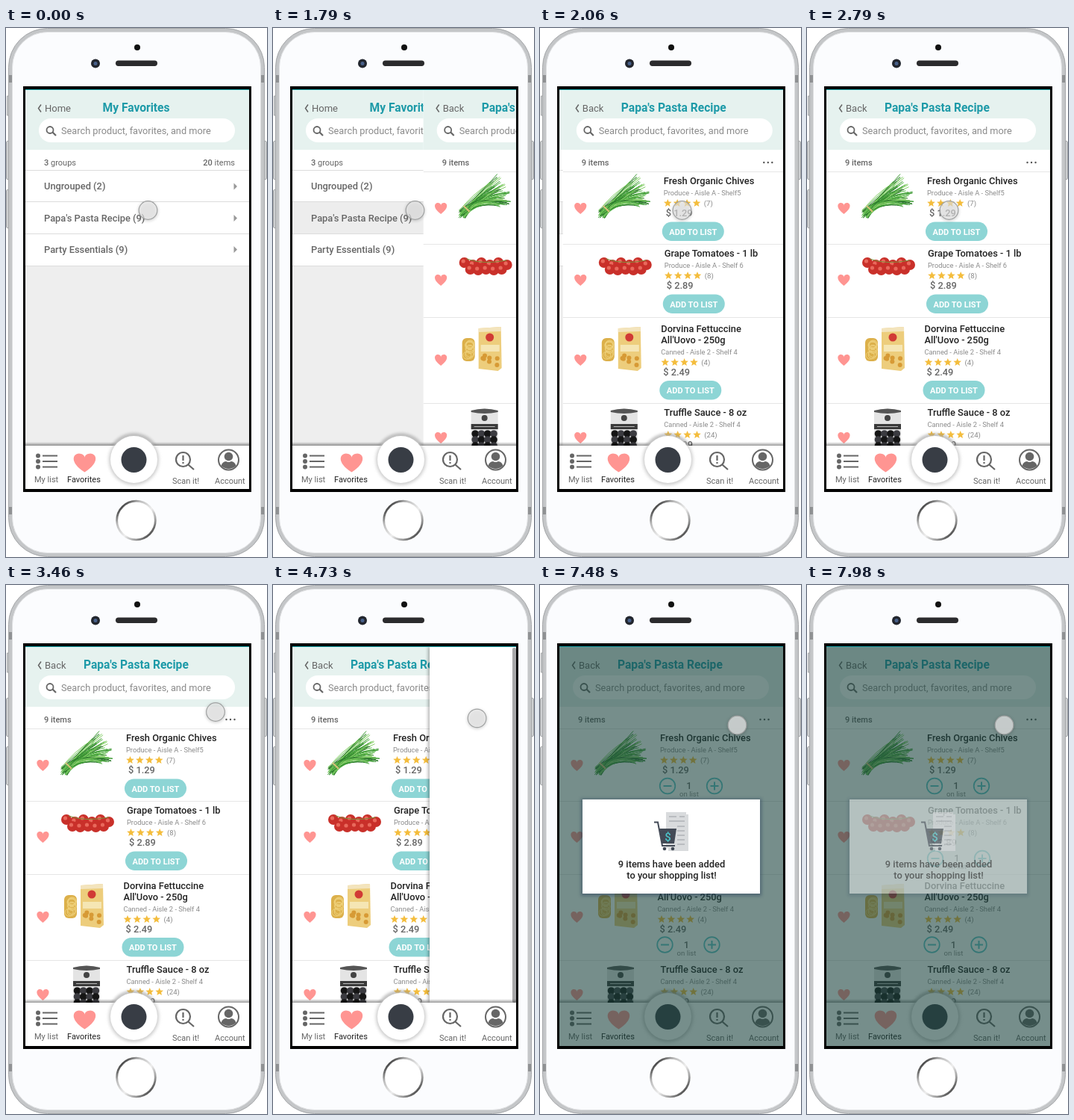
Animation, 350 px wide and 708 px high, one loop 8 s. Source, as an HTML page:

```html
<!DOCTYPE html>
<html lang="en">
<head>
<meta charset="utf-8">
<title>Favorites list</title>
<style>
html, body { margin: 0; width: 100%; height: 100%; overflow: hidden; background: #fff; }
svg { display: block; width: 350px; height: 708px; font-family: Roboto, sans-serif; font-size: 11px; fill: #666; }
.title { font-size: 15.6px; font-weight: 700; fill: #1d9aa8; }
.back { font-size: 13px; }
.hint { font-size: 12.75px; fill: #8a8a8a; }
.row { font-size: 12.85px; font-weight: 500; }
.name { font-size: 12.85px; font-weight: 500; fill: #222; }
.place { font-size: 9.3px; fill: #8b8b8b; }
.votes { font-size: 9.6px; fill: #8b8b8b; }
.price { font-size: 12.8px; font-weight: 500; }
.add { font-weight: 700; fill: #fff; }
.mid { text-anchor: middle; }
.b { font-weight: 500; }
.line { fill: none; stroke: #666; stroke-width: 2.2; }
.rule { stroke: #dcdcdc; }
</style>
</head>
<body>
<svg viewBox="0 0 350 708">
  <defs>
    <clipPath id="screen"><path d="M26 82H326V617H26Z"/></clipPath>
    <linearGradient id="steel" x2="1" y2="1">
      <stop offset=".08" stop-color="#222"/><stop offset=".3" stop-color="#bbb"/>
      <stop offset=".55" stop-color="#eee"/><stop offset=".75" stop-color="#999"/><stop offset=".95" stop-color="#222"/>
    </linearGradient>
    <linearGradient id="edge" x2="0" y2="1">
      <stop stop-color="#000" stop-opacity="0"/><stop offset="1" stop-color="#000" stop-opacity=".4"/>
    </linearGradient>
    <filter id="soft" x="-50%" y="-50%" width="200%" height="200%"><feGaussianBlur stdDeviation="2"/></filter>
    <path id="heart" d="M0 .9C-1.4-.1-1-.9-.5-.9C-.2-.9 0-.7 0-.5C0-.7.2-.9.5-.9C1-.9 1.4-.1 0 .9Z" fill="#ff9592"/>
    <g id="search">
      <path d="M26 83H326V163H26Z" fill="#e6f2ef"/>
      <path d="M47 102.500L43.500 107.500L47 112.500" fill="none" stroke="#666" stroke-width="1.5"/>
      <rect x="44" y="121" width="263" height="32" rx="16" fill="#fff"/>
      <path d="M62.500 139.500L67 144" class="line"/><circle cx="59" cy="136.500" r="4.500" class="line" style="stroke-width:1.8"/>
      <text x="74" y="142" class="hint">Search product, favorites, and more</text>
    </g>
  </defs>

  <!-- phone -->
  <g fill="#cfd1d3" stroke="#a4a6a8">
    <path d="M1.500 91H4V117H1.500ZM.500 153Q.500 151 4 151V203Q.500 203 .500 201ZM.500 218Q.500 216 4 216V268Q.500 268 .500 266ZM349.500 153Q349.500 151 346 151V203Q349.500 203 349.500 201Z"/>
    <rect x="3.500" y=".500" width="343" height="707" rx="52" fill="#c4c6c8"/>
  </g>
  <path d="M4 63h6v10h-6zM340 63h6v10h-6zM4 641h6v10h-6zM340 641h6v10h-6z" fill="#8f9193"/>
  <rect x="8.500" y="5.500" width="333" height="697" rx="47" fill="#fbfcfe" stroke="#dfe0e2"/>
  <circle cx="176" cy="26" r="4" fill="#111"/>
  <circle cx="120" cy="47.500" r="6" fill="#22262e"/><circle cx="120" cy="47.500" r="2.500" fill="#48608a"/>
  <rect x="147" y="43.500" width="56" height="7.500" rx="3.700" fill="#2b2b2d"/>
  <circle cx="174.500" cy="659" r="25.800" fill="#fff" stroke="url(#steel)" stroke-width="2.800"/>
  <path d="M23 78H329V621H23Z" fill="#000"/>

  <g clip-path="url(#screen)">
    <!-- groups page -->
    <path d="M26 83H326V617H26Z" fill="#eee"/>
    <path d="M26 163H326V318H26Z" fill="#fff"/>
    <path id="picked" d="M26 233H326V275H26Z" fill="#ededed"/>
    <use href="#search"/>
    <text x="52" y="112" class="back">Home</text>
    <text x="129.500" y="112" class="title">My Favorites</text>
    <text x="51" y="184"><tspan class="b">3</tspan> groups</text>
    <text x="307" y="184" text-anchor="end"><tspan class="b">20</tspan> items</text>
    <path d="M26 190.500H326M26 232.500H326M26 275.500H326M26 318.500H326" class="rule"/>
    <g class="row">
      <text x="51" y="216">Ungrouped (2)</text>
      <text x="51" y="259">Papa's Pasta Recipe (9)</text>
      <text x="51" y="301">Party Essentials (9)</text>
    </g>
    <path d="M305.500 207.500l4.500 4.500l-4.500 4.500zM305.500 250l4.500 4.500l-4.500 4.500zM305.500 292l4.500 4.500l-4.500 4.500z" fill="#999"/>

    <!-- recipe page -->
    <g id="page">
      <path d="M26 83H326V617H26Z" fill="#fff"/>
      <use href="#search"/>
      <text x="52" y="112" class="back">Back</text>
      <text x="104" y="112" class="title">Papa's Pasta Recipe</text>
      <text x="51" y="184" class="b">9 items</text>
      <path d="M295.500 180h.01M301 180h.01M306.500 180h.01" stroke="#555" stroke-width="2.400" stroke-linecap="round"/>
      <path d="M26 192.500H326M26 289.500H326M26 387.500H326M26 502.500H326" stroke="#e6e6e6"/>
      <g id="items"></g>
    </g>

    <!-- side drawer -->
    <g id="drawer">
      <path d="M1 83H124V559H1Z" fill="#000" opacity=".3" filter="url(#soft)"/>
      <path d="M3 83H124V559H3Z" fill="#fff"/>
    </g>
    <rect id="bar" x="321" y="84" width="5" height="475" rx="2" fill="#6a6a6c"/>
    <path d="M26 82.500H326" stroke="#1aa3a8"/>

    <!-- tab bar -->
    <path d="M26 554H326V559H26Z" fill="url(#edge)"/>
    <circle cx="171.500" cy="577" r="34" fill="#000" opacity=".3" filter="url(#soft)"/>
    <path d="M26 559H326V617H26Z" fill="#fff"/>
    <circle cx="171.500" cy="578" r="33.500" fill="#ccc" filter="url(#soft)"/>
    <circle cx="171.500" cy="577.500" r="31.500" fill="#fff"/>
    <circle cx="171.500" cy="578" r="17" fill="#383d45"/>
    <path d="M49 572.500H69M49 580H69M49 587.500H69" class="line"/>
    <path d="M43 572.500h.01M43 580h.01M43 587.500h.01" class="line" style="stroke-width:6;stroke-linecap:round"/>
    <use href="#heart" transform="translate(105.500 582)scale(15.300 14)"/>
    <circle cx="237.500" cy="577.500" r="9.500" class="line"/>
    <path d="M244.500 584.500L252 591M237.500 572V579M237.500 581V583" class="line"/>
    <circle cx="298.500" cy="578" r="13.500" class="line" style="stroke-width:2"/>
    <circle cx="298.500" cy="573.500" r="5.800"/>
    <path d="M288.500 586Q290 580.500 295 580Q298.500 582 302 580Q307 580.500 308.500 586Q298.500 594 288.500 586Z"/>
    <text x="38" y="608">My list</text>
    <text x="82" y="608" fill="#222">Favorites</text>
    <text x="223" y="610">Scan it!</text>
    <text x="280" y="610">Account</text>

    <!-- confirmation -->
    <path id="dim" d="M26 83H326V617H26Z" fill="#1b443e" fill-opacity=".6"/>
    <g id="card">
      <path d="M55 286H297V416H55Z" fill="#2c3f5c" opacity=".5" filter="url(#soft)"/>
      <path d="M57 287H295V413H57Z" fill="#fff"/>
    </g>
    <g id="note">
      <path d="M169 304H196V307H199V356H172V352H169Z" fill="#d9dbdd"/>
      <path d="M173 310H183M187 310H194M173 316H194M184 323H194M184 329H194M184 335H194M184 341H194M184 347H194" stroke="#aeb2b6" stroke-width="1.500"/>
      <path d="M160 326H183L180 346H164Z" fill="#434a56"/>
      <path d="M153 317.500H158L164 349H181" fill="none" stroke="#434a56" stroke-width="2"/>
      <circle cx="167" cy="353" r="2.300" fill="#434a56"/><circle cx="178" cy="353" r="2.300" fill="#434a56"/>
      <text x="171.500" y="341.500" class="mid" style="font-size:15px;font-weight:500;fill:#4cc3c8">$</text>
      <g class="name mid">
        <text x="176.500" y="378">9 items have been added</text>
        <text x="176.500" y="393">to your shopping list!</text>
      </g>
    </g>

    <g id="cursor">
      <circle cy="1" r="13" fill="#000" opacity=".2" filter="url(#soft)"/>
      <circle id="tip" r="12.300" fill="#f1f1f1" stroke="#a0a2a2" stroke-width="1.200"/>
    </g>
  </g>
</svg>

<script>
const el = id => document.getElementById(id);
let seed = 7;
const rnd = (a, b) => a + (b - a) * ((seed = seed * 16807 % 2147483647) / 2147483647);
const times = (n, f) => Array.from({ length: n }, (_, i) => f(i)).join('');
const text = (x, y, cls, s) => `<text x="${x}" y="${y}" class="${cls}">${s}</text>`;
const dot = (x, y, r, fill) => `<circle cx="${x}" cy="${y}" r="${r}" fill="${fill}"/>`;

function star(x, y) {
  const pts = times(10, i => {
    const r = i % 2 ? 2.5 : 5.6, a = i * Math.PI / 5;
    return `${x + r * Math.sin(a)},${y - r * Math.cos(a)} `;
  });
  return `<polygon points="${pts}" fill="#f4bd3d"/>`;
}

// a tied bundle whose blades spread and droop to the right
function chives() {
  return times(60, i => {
    const a = rnd(-.8, -.12), len = rnd(52, 72), x = 74 + rnd(-1, 8), y = 250 + rnd(-6, 5);
    const tx = Math.min(143, 76 + len * Math.cos(a)), ty = 246 + len * Math.sin(a);
    const green = ['#3c9a33', '#58b848', '#27702a', '#86cf68'][i % 4];
    return `<path d="M${x} ${y}Q${94 + rnd(-3, 5)} ${228 + rnd(-6, 6)} ${tx} ${ty}" fill="none" stroke="${green}"/>`;
  }) + '<path d="M80 238L88 246" stroke="#d8c27a" stroke-width="2"/>';
}

function tomatoes() {
  const one = (x, y) => dot(x, y, 7, '#c9302a') + dot(x - 1.5, y - 2, 2.6, '#e9695c');
  return times(6, i => one(81 + i * 11.4, 314 + 3 * (i % 2))) + times(5, i => one(89 + i * 10.5, 323 + i % 2)) +
    '<path d="M84 309Q105 317 138 311" fill="none" stroke="#7c8f3c"/>';
}

function pasta() {
  return '<rect x="78" y="415" width="17" height="31" rx="6" fill="#dcb04a"/>' +
    times(9, () => `<ellipse cx="${rnd(84, 89)}" cy="${rnd(422, 439)}" rx="5.500" ry="5" fill="none" stroke="#f0d27c"/>`) +
    '<path d="M100 402L130 400L131 455L126 459L100 456Z" fill="#edcd7c"/><path d="M100 402L130 400V406L100 407Z" fill="#f3e4bd"/>' +
    '<path d="M103 424H128V433H103Z" fill="#f5e6b4"/>' + dot(115, 414, 5.5, '#d13a35') +
    times(7, () => dot(rnd(104, 126), rnd(438, 453), 3, '#d79a35'));
}

function can() {
  return '<path d="M90 512Q108 507 126 512V560H90Z" fill="#e4e4e4"/><path d="M90 512Q108 507 126 512V514Q108 518 90 514Z" fill="#555"/>' +
    dot(108, 522, 4, '#444') + '<path d="M90 530H126V537H90Z" fill="#3a3a3a"/><path d="M94 533.500H122" stroke="#bbb"/>' +
    times(3, r => times(4, i => dot(95.5 + i * 8.3, 543 + r * 8, 4.8, (i + r) % 2 ? '#3b3b40' : '#151515')));
}

// x and y are the left edge and first baseline of the text block
const items = [
  { x: 161, y: 209, heart: 241, name: ['Fresh Organic Chives'], place: 'Produce - Aisle A - Shelf5', votes: 7, price: '1.29', art: chives },
  { x: 162, y: 306, heart: 337, name: ['Grape Tomatoes - 1 lb'], place: 'Produce - Aisle A - Shelf 6', votes: 8, price: '2.89', art: tomatoes },
  { x: 157.5, y: 407, heart: 444, name: ['Dorvina Fettuccine', "All'Uovo - 250g"], place: 'Canned - Aisle 2 - Shelf 4', votes: 4, price: '2.49', art: pasta },
  { x: 161.5, y: 519, heart: 548, name: ['Truffle Sauce - 8 oz'], place: 'Canned - Aisle 2 - Shelf 4', votes: 24, price: '6.99', art: can }
];

function stepper(x, y) {
  const ring = (cx, d) => `<circle cx="${cx}" cy="${y}" r="10.300" fill="none" stroke="#5cc4c8" stroke-width="1.700"/>` +
    `<path d="M${cx - 5.5} ${y}h11${d}" stroke="#5cc4c8" stroke-width="2" fill="none"/>`;
  return ring(x + 10, '') + ring(x + 73, 'm-5.500 -5.500v11') +
    text(x + 39, y + 4, 'price mid', '1') + text(x + 39, y + 14, 'votes mid', 'on list');
}

function item({ x, y, heart, name, place, votes, price, art }) {
  const end = y + 15 * (name.length - 1);
  const top = y + (name.length > 1 ? 65 : 50.5);
  return `<use href="#heart" transform="translate(49.500 ${heart + .5})scale(8.400 8.200)"/>` + art() +
    name.map((s, i) => text(x, y + 15 * i, 'name', s)).join('') +
    text(x, end + 14.5, 'place', place) +
    times(4, i => star(x + 5.5 + 12.9 * i, end + 25.5)) +
    text(x + 54, end + 29, 'votes', `(${votes})`) +
    text(x + 3, end + 42.5, 'price', '$ ' + price) +
    `<g class="buy"><rect x="${x - 2}" y="${top}" width="83" height="25.500" rx="12.750" fill="#8dd5d5"/>` +
    text(x + 39.5, top + 17, 'add mid', 'ADD TO LIST') + '</g>' +
    `<g class="count">${stepper(x, top + 9.5)}</g>`;
}
el('items').innerHTML = items.map(item).join('');

const clamp = v => Math.min(1, Math.max(0, v));
const part = (t, a, b) => clamp((t - a) / (b - a));
const smooth = p => p * p * (3 - 2 * p);

// cubic-bezier(.4, 0, .2, 1)
function glide(p) {
  let lo = 0, hi = 1, s = p;
  for (let i = 0; i < 20; i++) {
    s = (lo + hi) / 2;
    const x = 1.2 * s * (1 - s) ** 2 + .6 * s * s * (1 - s) + s ** 3;
    if (x < p) lo = s; else hi = s;
  }
  return 3 * s * s * (1 - s) + s ** 3;
}

const moves = [[2790, 3460, 281, 170], [3690, 3690, 283.5, 168.5], [3830, 3830, 285, 167], [4570, 4870, 264.5, 187.5]];
function cursorAt(t) {
  let x = 190.5, y = 244;
  for (const [a, b, nx, ny] of moves) {
    if (t < a) break;
    const p = a === b ? 1 : smooth(part(t, a, b));
    x += (nx - x) * p;
    y += (ny - y) * p;
  }
  return `translate(${x} ${y})`;
}

const buys = document.querySelectorAll('.buy'), counts = document.querySelectorAll('.count');
const show = (node, on) => node.style.display = on ? '' : 'none';

function draw(t) {
  const done = t >= 5470, fadeIn = !done ? 0 : t < 5540 ? .5 : 1, out = part(t, 7480, 7980);
  show(el('picked'), t >= 1630);
  show(el('page'), t >= 1630);
  el('page').setAttribute('transform', `translate(${300 * (1 - glide(part(t, 1626, 2146)))} 0)`);
  show(el('drawer'), t >= 4370 && !done);
  el('drawer').setAttribute('transform', `translate(${t < 4400 ? 265 : 207} 0)`);
  el('bar').setAttribute('opacity', part(t, 4540, 4870) * (1 - part(t, 5880, 6310)));
  buys.forEach(n => show(n, !done));
  counts.forEach(n => show(n, done));
  el('dim').setAttribute('opacity', fadeIn);
  el('card').setAttribute('opacity', fadeIn * (1 - .55 * out));
  el('note').setAttribute('opacity', fadeIn * (1 - .4 * out));
  el('cursor').setAttribute('transform', cursorAt(t));
  el('tip').setAttribute('fill', done ? '#dfe1e1' : '#f1f1f1');
  el('tip').setAttribute('fill-opacity', done ? .8 : t >= 1130 && t < 1790 ? .75 : .6);
}

function loop() {
  draw(performance.now() % 8000);
  requestAnimationFrame(loop);
}
loop();
</script>
</body>
</html>
```
